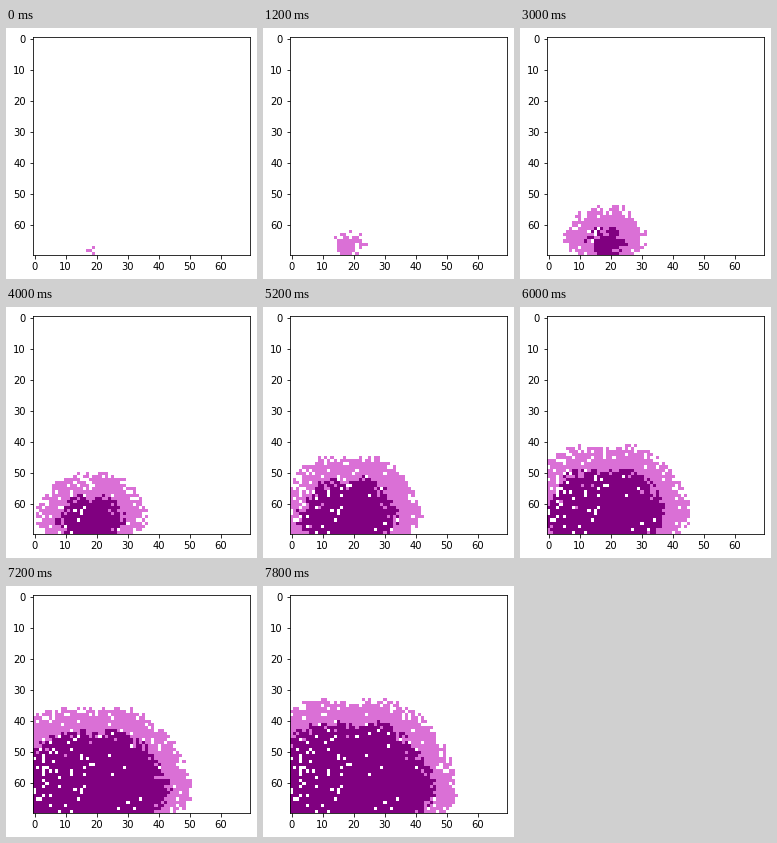
Recreate the animation shown at these times as a matplotlib script. Size 251x251 px, loop 8000 ms.

```python
import numpy as np
import matplotlib.pyplot as plt
from matplotlib.animation import FuncAnimation
from matplotlib.colors import ListedColormap

N = 70             # cells per side
STEPS = 40
SPEED = 0.9        # cells gained per step
LAG = 8            # steps before a cell turns dark
STAGE = 251.001    # pixels, nudged so truncation keeps 251
SIDE = 217.44

rng = np.random.default_rng(12)
row, col = np.mgrid[0:N, 0:N]
dx, dy = col - 18.3, row - 67.5

# Rounded front around the seed, held back a little along the floor
radius = (np.abs(dx) ** 2.5 + np.abs(dy) ** 2.5) ** 0.4
angle = np.arctan2(-dy, dx)
ripple = 0.6 * np.sin(7 * angle - 3.3) + 0.3 * np.sin(12 * angle + 2)
ripple *= np.minimum(radius / 8, 1)
floor = 0.8 * np.clip(row - 66, 0, None)
boost = 1.5 * np.exp(-radius / 10)
start = (radius + ripple + floor) / SPEED - boost
start += rng.exponential(1.5, (N, N))
start = np.maximum(start, 1)

# Cells that are never reached, more common on the left
spared = 0.03 + 0.16 * np.exp(-(col / 14) ** 2) * (row > 46)
start[(rng.random((N, N)) < spared) & (radius > 3)] = np.inf

for r, c in [(67, 19), (68, 17), (68, 18), (69, 19)]:
    start[r, c] = 0


def state(step):
    return (start <= step).astype(int) + (start + LAG <= step)


plt.rcParams["font.family"] = "DejaVu Sans"
fig = plt.figure(figsize=(STAGE / 72, STAGE / 72), dpi=72, facecolor="white")
ax = fig.add_axes([27.0 / STAGE, 24.14 / STAGE, SIDE / STAGE, SIDE / STAGE])
cmap = ListedColormap(["white", "orchid", "purple"])
img = ax.imshow(state(0), cmap=cmap, vmin=0, vmax=2,
                interpolation="nearest", aspect="auto")
ax.set_xticks(range(0, N, 10))
ax.set_yticks(range(0, N, 10))


def update(step):
    img.set_data(state(step))
    return [img]


anim = FuncAnimation(fig, update, frames=STEPS, interval=200,
                     repeat=True, repeat_delay=0, blit=False)
plt.show()
```
